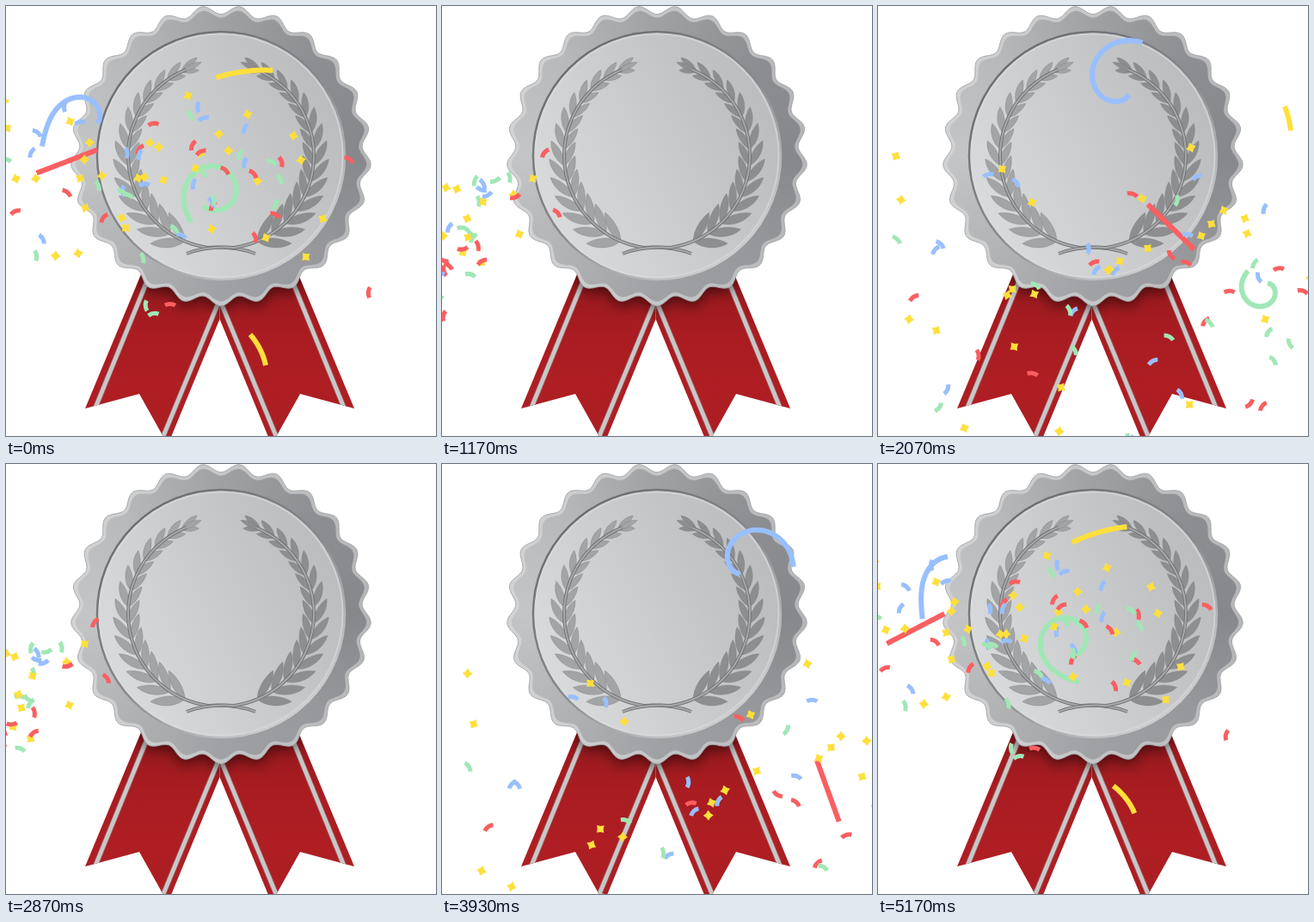
These frames come from a looping animation (500 by 500 pixels, 5.21 s). An HTML page with a canvas:

```html
<!DOCTYPE html>
<html lang="en">
<head>
<meta charset="utf-8">
<title>Medal with confetti</title>
<style>
html, body { margin: 0; width: 100%; height: 100%; overflow: hidden; background: #fff; }
canvas { display: block; }
</style>
</head>
<body>
<canvas id="stage" width="500" height="500"></canvas>
<script>
const LOOP = 5210, FRAMES = 156, CYCLE = 52, HALF = 26;
const GRAVITY = 1.555; // px per frame squared
const RED = '#fa5f61', BLUE = '#98bfff', GREEN = '#a1e7b6', YELLOW = '#ffdf3b';
const RAD = Math.PI / 180, CX = 250, CY = 174;
const stage = document.getElementById('stage').getContext('2d');
const clamp = (v, low, high) => Math.max(low, Math.min(high, v));

// ---- Medal, drawn once ----
const medal = document.createElement('canvas');
medal.width = medal.height = 500;
const m = medal.getContext('2d');

function stroke(color, width) {
  m.strokeStyle = color;
  m.lineWidth = width;
  m.stroke();
}

function fill(color) {
  m.fillStyle = color;
  m.fill();
}

function path(...points) {
  m.beginPath();
  points.forEach(([x, y]) => m.lineTo(x, y));
}

function gradient(g, ...stops) {
  stops.forEach((c, i) => g.addColorStop(i / (stops.length - 1), c));
  return g;
}

function mirrored(axis, draw) {
  draw(false);
  m.save();
  m.translate(2 * axis, 0);
  m.scale(-1, 1);
  draw(true);
  m.restore();
}

function stripe(from, to) {
  path(from, to);
  stroke('#99555a', 6.5);
  stroke('#c9c7c7', 4.8);
}

function ribbon() {
  m.save();
  path([162, 300], [92, 468], [155, 451], [183, 501], [192, 501], [248.5, 364], [248.5, 300]);
  m.closePath();
  fill(gradient(m.createLinearGradient(0, 320, 0, 500), '#98191d', '#a91c21', '#ae1e23', '#ac1e23'));
  m.clip();
  stripe([166, 315], [104, 467]);
  stripe([247, 345], [183, 500]);
  m.restore();
}

function scallop(radius, depth) {
  m.beginPath();
  for (let i = 0; i < 720; i++) {
    const a = i * RAD / 2, r = radius - depth * Math.cos(25 * a);
    m.lineTo(CX + r * Math.sin(a), CY - r * Math.cos(a));
  }
  m.closePath();
}

function circle(r) {
  m.beginPath();
  m.arc(CX, CY, r, 0, 7);
}

function leaf(x, y, angle, length, width, color) {
  m.save();
  m.translate(x, y);
  m.rotate(angle);
  m.beginPath();
  m.moveTo(0, 0);
  m.bezierCurveTo(length * .3, -width, length * .75, -width * .8, length, 0);
  m.bezierCurveTo(length * .75, width * .6, length * .3, width * .8, 0, 0);
  fill(color);
  stroke('#7b7c7e77', .8);
  m.restore();
}

function branch(dark) {
  const color = dark ? '#8d8e90' : '#a3a4a6';
  for (let i = 0; i < 14; i++) {
    const k = i / 13, a = (113 + 132 * k) * RAD, along = a + Math.PI / 2;
    const x = CX + 108 * Math.cos(a), y = CY + 108 * Math.sin(a);
    leaf(x, y, along - (27 - 10 * k) * RAD, 40 - 16 * k, 9 - 3.5 * k, color);
    leaf(x, y, along + (38 - 16 * k) * RAD, 38 - 18 * k, 8 - 3 * k, color);
    if (k === 1) leaf(x, y, along, 25, 5, color);
  }
  m.beginPath();
  m.arc(CX, CY, 108, 248 * RAD, 98 * RAD, true);
  m.quadraticCurveTo(266, 279, 290, 288);
  stroke('#737476', 4);
  stroke('#a7a8aa', 2);
}

mirrored(248.5, ribbon);
m.save();
m.shadowColor = '#0008';
m.shadowBlur = 16;
m.shadowOffsetY = 6;
m.globalCompositeOperation = 'source-atop';
scallop(169, 5);
fill('#777');
m.restore();
scallop(169.5, 5);
fill(gradient(m.createLinearGradient(75, 0, 425, 0), '#d2d3d4', '#c5c6c7', '#b4b5b7'));
stroke('#a5a6a8', 1);
scallop(165, 4.5);
fill(gradient(m.createConicGradient(-Math.PI / 2, CX, CY),
  '#a0a1a3', '#8d8e91', '#87888b', '#97989b', '#a0a1a4', '#b2b3b5', '#c4c5c7', '#b8b9bb', '#a0a1a3'));
circle(144);
fill(gradient(m.createLinearGradient(370, 110, 125, 230), '#bcbdbf', '#c5c6c8', '#cfd0d1', '#d8d9da'));
stroke(gradient(m.createLinearGradient(150, 50, 350, 300), '#6a6b6e', '#88898c', '#d4d5d6'), 2.5);
circle(141.5);
stroke('#dcddde99', 2);
mirrored(CX, branch);

// ---- Confetti: small pieces shot from beyond the left edge ----
let seed = 11;
function random(low, high) {
  seed = seed * 16807 % 2147483647;
  return low + (high - low) * seed / 2147483647;
}

const colors = [YELLOW, RED, YELLOW, BLUE, GREEN];
const pieces = Array.from({ length: 80 }, (_, i) => ({
  color: colors[i % colors.length],
  launch: 17 + 11 * random(0, 1) ** 1.5, // frames before mid-burst
  y: random(340, 430),
  vx: random(2, 18),
  vy: random(-28, -22.5),
  tilt: random(-90, 90),
  spin: random(-8, 8)
}));

function star() {
  stage.beginPath();
  for (let i = 0; i < 8; i++) {
    const r = i % 2 ? 3.5 : 6, a = i * Math.PI / 4;
    stage.lineTo(r * Math.cos(a), r * Math.sin(a));
  }
  stage.fill();
}

function strip() {
  stage.beginPath();
  stage.moveTo(-6, 1);
  stage.quadraticCurveTo(0, -2.5, 6, .5);
  stage.stroke();
}

function drawPiece(p, s) {
  const age = s + p.launch;
  if (age < 0) return;
  stage.save();
  stage.translate(-40 + p.vx * age, p.y + p.vy * age + GRAVITY / 2 * age * age);
  stage.rotate((p.tilt + p.spin * s) * RAD);
  stage.fillStyle = stage.strokeStyle = p.color;
  stage.lineWidth = 5;
  if (p.color === YELLOW) star();
  else strip();
  stage.restore();
}

// ---- Streamers: ribbons whose heading turns along their length ----
const streamers = [
  { color: BLUE, x: 84, y: 118, vx: 17, vy: -12, drag: -.3, length: 150, tilt: -68, spin: 17, turn: 290, ease: 2, unroll: .25 },
  { color: GREEN, x: 248, y: 218, vx: 20.5, vy: 5, length: 190, tilt: -95, spin: 45, turn: 350, ease: 1.3, shrink: .05 },
  { color: RED, x: 87, y: 176, vx: 27, vy: -7, fall: 1.66, length: 78, tilt: -17, spin: 6.5 },
  { color: YELLOW, x: 289, y: 76, vx: 20, vy: -1.5, length: 69, tilt: -12, spin: 8, turn: 20, shrink: .06 },
  { color: YELLOW, x: 298, y: 406, vx: 5.5, vy: 11.8, drag: .75, length: 42, tilt: 55, spin: 10, turn: 30, shrink: .1 }
];

function drawStreamer(r, s) {
  const { drag = 0, fall = GRAVITY / 2, turn = 0, ease = 1, unroll = 0, shrink = 0 } = r;
  const steps = 30, reach = clamp(1 + unroll * s, .5, 1);
  const step = r.length * reach / steps * clamp(1 - shrink * s, .2, 1);
  const curl = Math.max(.6, ease - .15 * s);
  const points = [];
  let x = 0, y = 0, sumX = 0, sumY = 0;
  for (let i = 0; i < steps; i++) {
    const heading = (r.tilt + r.spin * s + turn * (reach * i / steps) ** curl) * RAD;
    points.push([x += step * Math.cos(heading), y += step * Math.sin(heading)]);
    sumX += x;
    sumY += y;
  }
  stage.save();
  stage.translate(r.x + r.vx * s - drag * s * s - sumX / steps, r.y + r.vy * s + fall * s * s - sumY / steps);
  stage.beginPath();
  points.forEach(([px, py]) => stage.lineTo(px, py));
  stage.strokeStyle = r.color;
  stage.lineWidth = 6;
  stage.lineJoin = 'round';
  stage.stroke();
  stage.restore();
}

function render(now) {
  const n = Math.floor(now % LOOP / LOOP * FRAMES + .3) % FRAMES;
  const s = (n + HALF - .6) % CYCLE - HALF; // frames from mid-burst
  stage.fillStyle = '#fff';
  stage.fillRect(0, 0, 500, 500);
  stage.drawImage(medal, 0, 0);
  streamers.forEach(r => drawStreamer(r, s));
  pieces.forEach(p => drawPiece(p, s));
}

const start = performance.now();
function tick() {
  render(performance.now() - start);
  requestAnimationFrame(tick);
}
tick();
</script>
</body>
</html>
```
